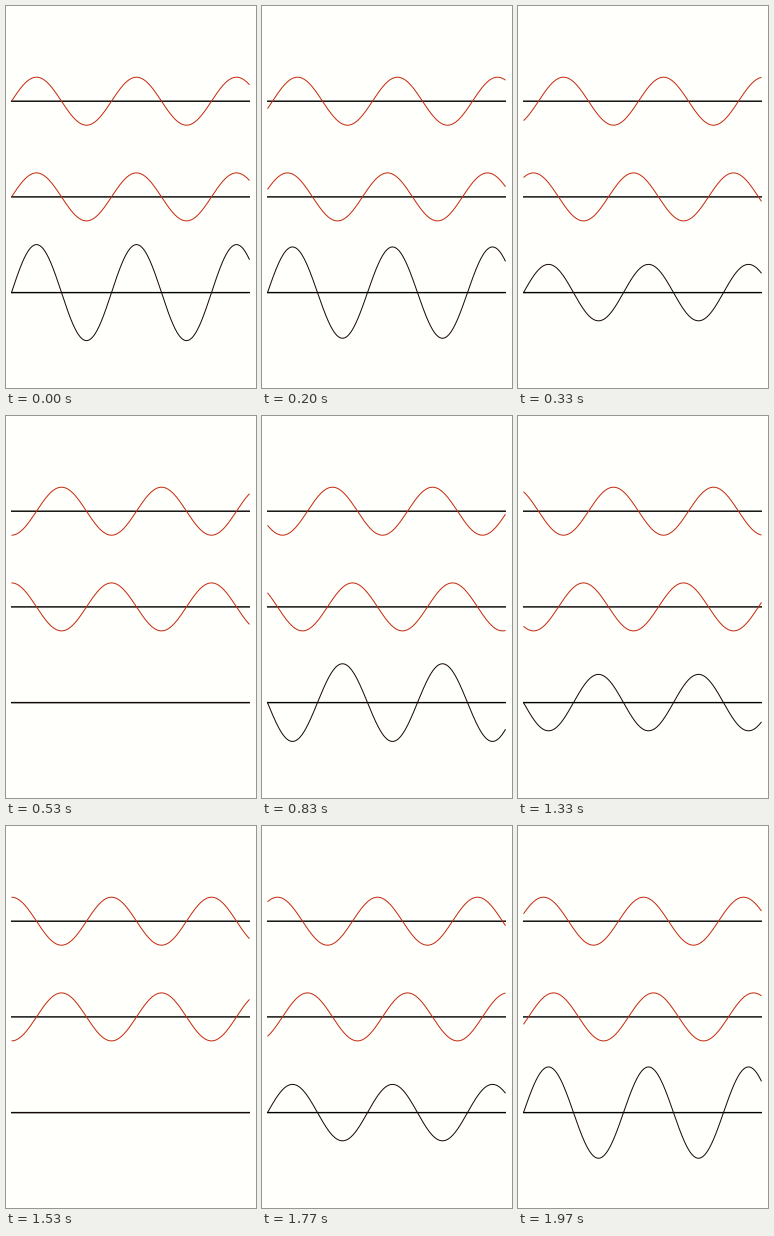
A matplotlib script that plays this animation: 250 px wide and 382 px high, repeating every 2.01 s.

```python
import numpy as np
import matplotlib.pyplot as plt
from matplotlib.animation import FuncAnimation

W, H, DPI = 250, 382, 100
LEFT, RIGHT = 5.5, 243.5
AXES_Y = (95.2, 190.9, 286.6)
WAVELENGTH, AMP = 100, 24
POSES = 20
TICK = 10            # ms per animation step
FRAMES = 201
RED, DARK = "#c62a10", "#180a04"

fig = plt.figure(figsize=(W / DPI, H / DPI), dpi=DPI, facecolor="#fffffb")
ax = fig.add_axes([0, 0, 1, 1])
ax.set_xlim(0, W)
ax.set_ylim(H, 0)
ax.axis("off")

x = np.arange(LEFT, RIGHT + 0.5, 0.5)
kx = 2 * np.pi * (x - LEFT) / WAVELENGTH


def stroke(xs, ys, color, width, z):
    return ax.plot(xs, ys, color=color, lw=width * 72 / DPI, snap=False,
                   solid_capstyle="butt", zorder=z)[0]


for y in AXES_Y:
    stroke([LEFT - 0.5, RIGHT + 0.5], [y, y], "black", 1.4, 1)

waves = [stroke(x, 0 * x + y, c, 1, 2)
         for y, c in zip(AXES_Y, (RED, RED, DARK))]


def update(i):
    # the phase advances in held steps of 100 ms, the first a little longer
    pose = max(i * TICK - 30, 0) // 100
    phase = 2 * np.pi * pose / POSES
    right = AMP * np.sin(kx - phase)
    left = AMP * np.sin(kx + phase)
    for wave, y, shape in zip(waves, AXES_Y, (right, left, right + left)):
        wave.set_ydata(y - shape)
    return waves


anim = FuncAnimation(fig, update, frames=FRAMES, interval=TICK,
                     repeat=True, repeat_delay=0, blit=False)
plt.show()
```
